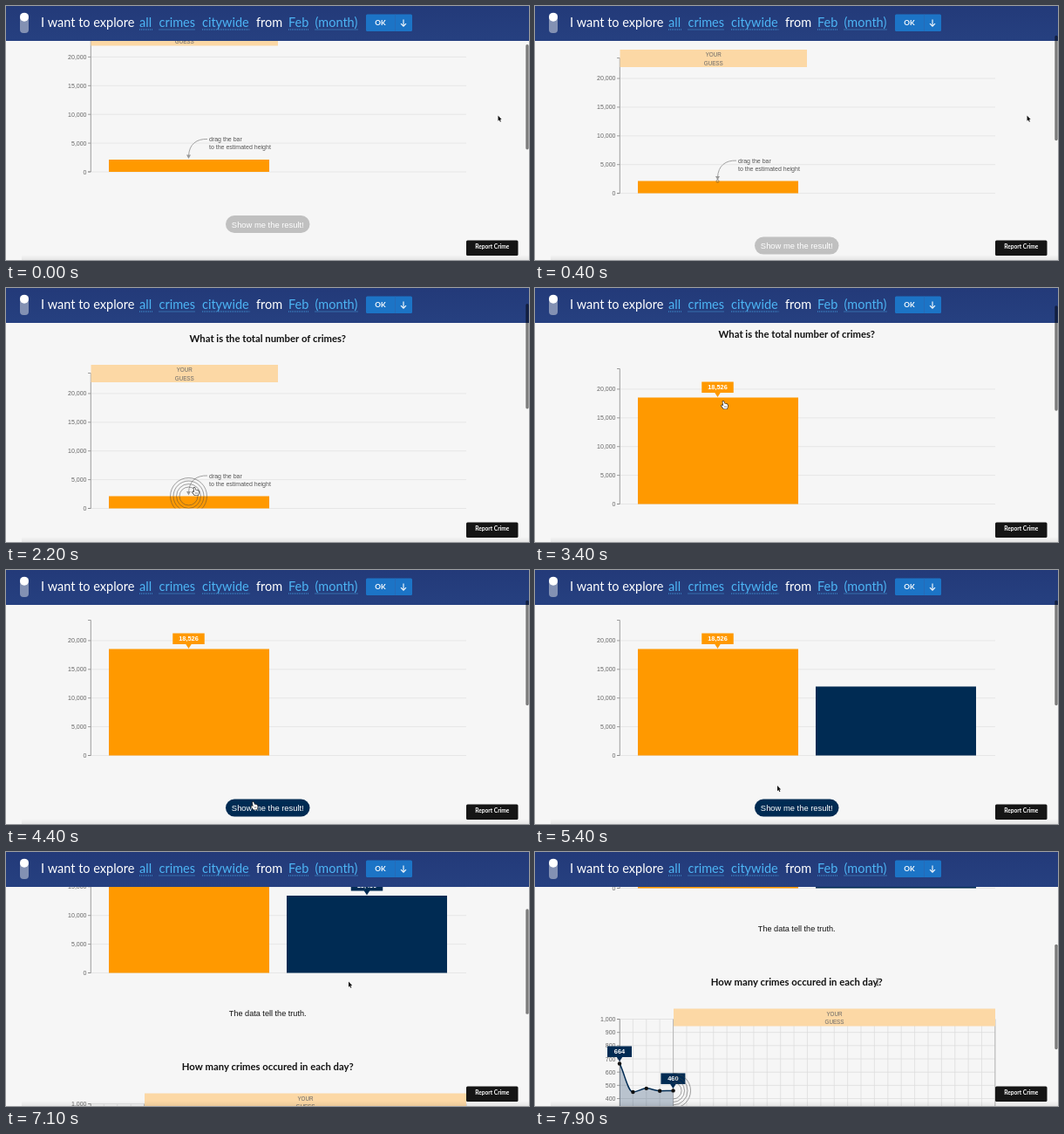
An HTML page with a canvas that plays this animation: 600 px wide and 291 px high, repeating every 8000 ms.

```html
<!DOCTYPE html>
<html lang="en">
<head>
<meta charset="utf-8">
<title>Guess the crimes</title>
<style>
html, body { margin: 0; width: 100%; height: 100%; overflow: hidden; background: #f6f6f6; }
canvas { display: block; width: 100vw; height: 100vh; }
</style>
</head>
<body>
<canvas id="stage"></canvas>
<script>
const W = 600, H = 291, LOOP = 8000, STEP = 100;
const SANS = '"Liberation Sans", Arial, sans-serif', LATO = 'Lato, sans-serif';
const ORANGE = '#ff9900', NAVY = '#002b53', PEACH = '#fcd8a5', GREY = '#555';
const UNIT = 32.9 / 5000;      // pixels per crime in the first chart
const GUESS = 18526, TRUTH = 13439, START = 2130;
const canvas = document.getElementById('stage');
const c = canvas.getContext('2d');

const clamp = u => Math.max(0, Math.min(1, u));
const smooth = u => u * u * (3 - 2 * u);
const cubic = u => u < .5 ? 4 * u ** 3 : 1 - 4 * (1 - u) ** 3;
const span = (t, a, b) => clamp((t - a) / (b - a));

// Eased value between keys of [time, value]
function track(t, keys) {
  let value = keys[0][1];
  for (let i = 1; i < keys.length; i++) {
    const [a, from] = keys[i - 1], [b, to] = keys[i];
    if (t >= a) value = from + (to - from) * smooth(span(t, a, b));
  }
  return value;
}

const baseKeys = [[0, 190], [100, 190], [800, 252.5], [3200, 252.5], [3400, 247.5],
  [3900, 212.5], [6200, 212.5], [7100, 138.5], [7200, 138.5], [7900, 41.5]];
const cursorX = [[0, 564.5], [1300, 564.5], [2100, 217.5], [3700, 217.5], [4400, 285],
  [4800, 285], [5300, 278], [5900, 278], [6500, 393]];
const cursorY = [[0, 125.5], [1300, 125.5], [2100, 233], [2500, 233], [3200, 134],
  [3700, 134], [4400, 270], [4800, 270], [5300, 247], [5900, 247], [6500, 148.5]];

function text(s, x, y, size, color = GREY, align = 'left', family = SANS, weight = 400) {
  c.font = `${weight} ${size}px ${family}`;
  c.fillStyle = color;
  c.textAlign = align;
  c.fillText(s, x, y);
}

function box(x, y, w, h, color, r = 0) {
  c.fillStyle = color;
  c.beginPath();
  c.roundRect(x, y, w, h, r);
  c.fill();
}

function line(points, color, width = 1) {
  c.strokeStyle = color;
  c.lineWidth = width;
  c.beginPath();
  points.forEach(p => c.lineTo(...p));
  c.stroke();
}

function faded(alpha, draw) {
  if (alpha <= 0) return;
  c.save();
  c.globalAlpha = alpha;
  draw();
  c.restore();
}

function tag(s, x, y, w, color) {
  box(x - w / 2, y - 18, w, 12.5, color);
  c.beginPath();
  c.moveTo(x - 3.5, y - 6);
  c.lineTo(x + 3.5, y - 6);
  c.lineTo(x, y - .5);
  c.fill();
  text(s, x, y - 9.2, 7.4, '#fff', 'center', SANS, 700);
}

function guessBox(x, y, w) {
  box(x, y, w, 20, PEACH);
  text('YOUR', x + w / 2, y + 8, 6.3, '#666', 'center');
  text('GUESS', x + w / 2, y + 17.7, 6.3, '#666', 'center');
}

function pulse(t, start, x, y, clip) {
  const age = (t - start + 2400) % 2400, lead = age * .0108;
  c.save();
  c.beginPath();
  c.rect(...clip);
  c.clip();
  c.globalAlpha = .55 * (1 - span(age, 1950, 2140));
  c.strokeStyle = '#444';
  c.lineWidth = .9;
  for (let i = 0; i < 4; i++) {
    const r = lead - 3.5 * i;
    if (r <= 0) continue;
    c.beginPath();
    c.arc(x, y, r, 0, 7);
    c.stroke();
  }
  c.restore();
}

function hint(z) {
  c.strokeStyle = c.fillStyle = '#999';
  c.lineWidth = .9;
  c.beginPath();
  c.moveTo(231, z - 37.5);
  c.bezierCurveTo(219, z - 38, 210, z - 32, 209.5, z - 18);
  c.stroke();
  c.beginPath();
  c.moveTo(207, z - 19.5);
  c.lineTo(212, z - 19.5);
  c.lineTo(209.5, z - 15);
  c.fill();
  text('drag the bar', 233, z - 34.7, 7);
  text('to the estimated height', 233, z - 26, 7);
}

function totalChart(t, z) {
  const dragging = t >= 2500;
  const guess = track(t, [[2500, START], [3200, GUESS]]);
  const truth = TRUTH * cubic(span(t, 4700, 5700));
  text('What is the total number of crimes?', 300.3, z - 190.7, 11.3, '#111', 'center', LATO, 700);
  for (let i = 0; i < 5; i++) {
    const y = z - i * 5000 * UNIT;
    line([[97, y], [528, y]], '#e3e3e3', .8);
    line([[94, y], [97, y]], '#888', .8);
    text((i * 5000).toLocaleString('en-US'), 92.5, y + 2.5, 7, '#666', 'right');
  }
  line([[94, z - 155], [97.3, z - 155], [97.3, z], [94, z]], '#888', .8);
  box(118, z - guess * UNIT, 184, guess * UNIT, ORANGE);
  box(322, z - truth * UNIT, 184, truth * UNIT, NAVY);
  if (dragging) {
    tag(Math.round(guess).toLocaleString('en-US'), 209.5, z - guess * UNIT, 36.5, ORANGE);
  } else {
    guessBox(97.5, z - 164.5, 214.5);
    hint(z);
    pulse(t, 260, 209.5, z - 14, [97, z - 60, 431, 60]);
  }
  faded(span(t, 5600, 5900), () =>
    tag(TRUTH.toLocaleString('en-US'), 414, z - truth * UNIT, 36.5, NAVY));
  faded(1 - span(t, 5800, 6100), () => {
    box(252, z + 50, 96.5, 20, dragging ? NAVY : '#c0c0c0', 10);
    text('Show me the result!', 300.3, z + 63.5, 9.4, '#fff', 'center');
  });
  faded(span(t, 6000, 6300), () =>
    text('The data tell the truth.', 300.2, z + 49.7, 9.15, '#111', 'center'));
}

function dailyChart(t, z) {
  const top = z + 150, row = 15.17, col = 15.39, bottom = top + 10 * row;
  const points = [664, 450, 477, 458, 460].map((v, i) => [97 + i * col, top + (1000 - v) * row / 100]);
  text('How many crimes occured in each day?', 300.2, z + 111.3, 11.3, '#111', 'center', LATO, 700);
  for (let i = 0; i <= 28; i++) line([[97 + i * col, top], [97 + i * col, bottom]], '#dedede', .8);
  for (let i = 0; i <= 10; i++) {
    const y = top + i * row;
    line([[97, y], [528, y]], '#dedede', .8);
    line([[94, y], [97, y]], '#888', .8);
    text((1000 - i * 100).toLocaleString('en-US'), 92.5, y + 2.5, 7, '#666', 'right');
  }
  line([[94, top], [97.3, top], [97.3, bottom]], '#888', .8);
  for (const x of [158.6, 527.8]) line([[x, top], [x, bottom]], '#aaa', .8);
  guessBox(159, z + 138, 369);

  const curve = new Path2D();
  curve.moveTo(...points[0]);
  for (let i = 1; i < points.length; i++) {
    const [x0, y0] = points[i - 1], [x1, y1] = points[i], k = col * .38;
    const slope0 = i === 1 ? 1.9 : 0;
    curve.bezierCurveTo(x0 + k, y0 + k * slope0, x1 - k, y1, x1, y1);
  }
  const area = new Path2D(curve);
  area.lineTo(points[4][0], bottom);
  area.lineTo(97, bottom);
  c.fillStyle = 'rgba(0,43,83,.25)';
  c.fill(area);
  c.strokeStyle = NAVY;
  c.lineWidth = 1.5;
  c.stroke(curve);
  c.fillStyle = '#111';
  for (const [x, y] of points) {
    c.beginPath();
    c.arc(x, y, 2.2, 0, 7);
    c.fill();
  }
  tag('664', 97, points[0][1] - 2, 28, NAVY);
  tag('460', 158.4, points[4][1] - 2, 28, NAVY);
  pulse(t, 6050, points[4][0], points[4][1], [158.6, top, 370, 160]);
  text('draw the graph', 173, z + 254, 7);
}

function header() {
  const g = c.createLinearGradient(0, 0, 0, 40);
  g.addColorStop(0, '#233a79');
  g.addColorStop(1, '#264080');
  c.fillStyle = g;
  c.fillRect(0, 0, W, 40);
  box(16, 8, 10, 23, '#8391b3', 4);
  c.fillStyle = '#fff';
  c.beginPath();
  c.arc(21, 12.8, 5, 0, 7);
  c.fill();
  text('I want to explore', 40, 24.4, 14.5, '#fff', 'left', LATO);
  text('from', 287, 24.4, 14.5, '#fff', 'left', LATO);
  const links = [['all', 153, 168], ['crimes', 175.5, 217.5], ['citywide', 225, 279.5],
    ['Feb', 324, 347.5], ['(month)', 354.5, 404.5]];
  for (const [word, a, b] of links) {
    text(word, a, 24.4, 14.5, '#4db5f5', 'left', LATO);
    c.setLineDash([1, 1]);
    line([[a, 27], [b, 27]], '#4db5f5', .8);
    c.setLineDash([]);
  }
  box(413, 9.5, 53, 19.5, '#1c74c6', 1.5);
  line([[446.5, 9.5], [446.5, 29]], '#2a66b0', .7);
  text('OK', 429.5, 22.3, 8.3, '#fff', 'center', LATO, 700);
  line([[456, 15.5], [456, 23]], '#fff', 1.1);
  line([[453, 20.2], [456, 23.2], [459, 20.2]], '#fff', 1.1);
}

function shape(points, fill, stroke, width) {
  c.beginPath();
  points.forEach(p => c.lineTo(...p));
  c.closePath();
  c.fillStyle = fill;
  c.strokeStyle = stroke;
  c.lineWidth = width;
  c.lineJoin = 'round';
  c.stroke();
  c.fill();
}

function cursor(t) {
  const onBar = t >= 2000 && t < 3800, onButton = t >= 4300 && t < 5000, onText = t >= 7800;
  c.save();
  c.translate(track(t, cursorX), track(t, cursorY));
  if (onText) {
    line([[-1.5, -3.5], [0, -3], [1.5, -3.5]], '#333', .8);
    line([[0, -3], [0, 4]], '#333', .8);
    line([[-1.5, 4.5], [0, 4], [1.5, 4.5]], '#333', .8);
  } else if (onBar || onButton) {
    shape([[-2.2, -4], [-1, -4.2], [0, -1.4], [2.6, -1], [3.6, .2], [3.3, 3], [2.5, 4.4],
      [-1, 4.4], [-3.6, 1], [-3, .2], [-1.4, 1]], '#fff', '#222', 1.3);
    line([[.2, 1], [.4, 3]], '#444', .5);
    line([[1.7, 1], [1.7, 3]], '#444', .5);
  } else {
    shape([[0, 0], [0, 6.2], [1.4, 5], [2.4, 7.3], [3.4, 6.8], [2.4, 4.6], [4.2, 4.4]], '#111', '#fff', 1);
  }
  c.restore();
}

function draw(t) {
  const z = track(t, baseKeys);
  c.fillStyle = '#f6f6f6';
  c.fillRect(0, 0, W, H);
  totalChart(t, z);
  dailyChart(t, z);
  const shade = c.createLinearGradient(0, 285, 0, H);
  shade.addColorStop(0, 'rgba(0,0,0,0)');
  shade.addColorStop(1, 'rgba(0,0,0,.07)');
  c.fillStyle = shade;
  c.fillRect(18, 285, W - 18, 6);
  header();
  box(528, 268.5, 59.5, 17.5, '#151515', 1.5);
  text('Report Crime', 557.8, 278.3, 6.6, '#fff', 'center', LATO, 700);
  box(596.3, 44 + (190 - z) * .415, 3.4, 120.5, 'rgba(0,0,0,.5)', 1.7);
  cursor(t);
}

function frame(now) {
  const ratio = devicePixelRatio || 1;
  const w = Math.round(innerWidth * ratio), h = Math.round(innerHeight * ratio);
  if (canvas.width !== w || canvas.height !== h) {
    canvas.width = w;
    canvas.height = h;
  }
  c.setTransform(w / W, 0, 0, h / H, 0, 0);
  draw(Math.floor((now % LOOP) / STEP) * STEP);
  requestAnimationFrame(frame);
}
requestAnimationFrame(frame);
</script>
</body>
</html>
```
